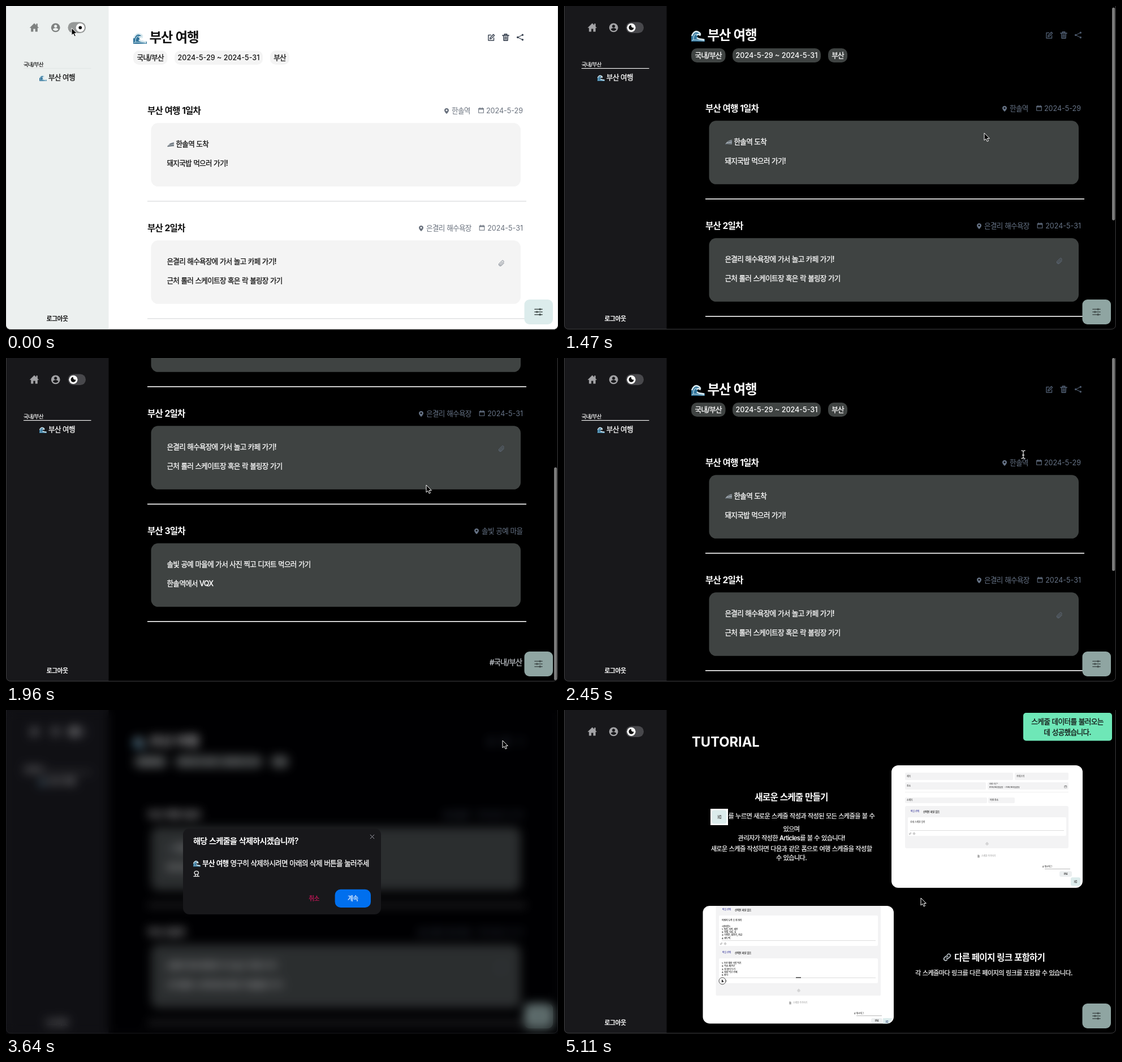
These frames come from a looping animation (976 by 574 pixels, 5.39 s). An HTML page:

```html
<!DOCTYPE html>
<html lang="ko">
<head>
<meta charset="utf-8">
<title>여행 스케줄</title>
<style>
:root {
  --k: 0%;
  --bg: color-mix(in srgb, #fff, #000 var(--k));
  --side: color-mix(in srgb, #ecf0ef, #18181b var(--k));
  --ink: color-mix(in srgb, #111, #fff var(--k));
  --card: color-mix(in srgb, #f4f4f4, #3f4342 var(--k));
  --rule: color-mix(in srgb, #e1e3e4, #fff var(--k));
  --side-rule: color-mix(in srgb, #e2e6e5, #fff var(--k));
  --meta: color-mix(in srgb, #69717d, #667386 var(--k));
  --tool: color-mix(in srgb, #3b4452, #4b586b var(--k));
  --nav: color-mix(in srgb, #7f8281, #a3a3a6 var(--k));
  --track: color-mix(in srgb, #969998, #48484c var(--k));
  --fab: color-mix(in srgb, #dcecec, #8fa5a2 var(--k));
  --edge: color-mix(in srgb, #d4d6d6, #3c3c3e var(--k));
}
html, body { margin: 0; width: 100%; height: 100%; overflow: hidden; background: #000; }
svg, #veil { position: absolute; left: 0; top: 0; width: 976px; height: 574px; }
#veil { background: rgba(2, 2, 8, .31); backdrop-filter: blur(9px); }
text {
  font-family: Inter, "Noto Sans CJK KR", "Noto Sans CJK", sans-serif;
  letter-spacing: -.055em; word-spacing: .05em; white-space: pre;
  fill: currentColor; stroke: currentColor; stroke-width: 0;
}
text.latin { letter-spacing: 0; word-spacing: 0; }
text.medium { stroke-width: .022em; }
</style>
</head>
<body>
<svg id="page" viewBox="0 0 976 574"></svg>
<div id="veil"></div>
<svg id="top" viewBox="0 0 976 574"></svg>
<script>
const LOOP = 5390, STEP = 70;
const $ = id => document.getElementById(id);

// Drawing helpers; text is placed by its vertical centre.
const text = (x, y, size, str, { fill = 'var(--ink)', weight = 500, anchor = 'start', latin } = {}) =>
  `<text x="${x}" y="${y + size * .37}" font-size="${size}" font-weight="${weight}" text-anchor="${anchor}"
    class="${latin ? 'latin' : weight === 500 ? 'medium' : ''}" style="color:${fill}">${str}</text>`;
const mid = (x, y, size, str, opt) => text(x, y, size, str, { anchor: 'middle', ...opt });
const rect = (x, y, w, h, r, fill, attrs = '') =>
  `<rect x="${x}" y="${y}" width="${w}" height="${h}" rx="${r}" style="fill:${fill}" ${attrs}/>`;
const circle = (x, y, r, fill) => `<circle cx="${x}" cy="${y}" r="${r}" style="fill:${fill}"/>`;
const group = (id, body) => `<g id="${id}">${body}</g>`;

const SOLID = {
  home: 'M10 21v-6h4v6h5v-8h3l-3-2.8V4h-3v3.2L12 3 2 13h3v8z',
  user: 'M12 2a10 10 0 1 0 0 20a10 10 0 1 0 0-20zm0 3.5a3.3 3.3 0 1 1 0 6.6a3.3 3.3 0 1 1 0-6.6zm0 13.7c-2.5 0-4.7-1.3-6-3.2c0-2 4-3.1 6-3.1s6 1.1 6 3.1c-1.3 1.9-3.5 3.2-6 3.2z',
  pin: 'M12 2C8 2 4 5 4 9.5c0 5.3 8 13 8 13s8-7.7 8-13C20 5 16 2 12 2zm0 4.5a3 3 0 1 1 0 6a3 3 0 1 1 0-6z',
  moon: 'M12 3a9 9 0 1 0 9 9a7 7 0 0 1-9-9z',
  file: 'M5 2h9l5 5v15H5z'
};
const LINE = {
  calendar: 'M3 5h18v16H3zM3 8h18M8 1v5M16 1v5',
  edit: 'M11 4H3v17h17v-8M18.5 2l3.5 3.5L12 15l-4 1l1-4z',
  trash: 'M2 6h20M8 6V2h8v4M5 6l1 16h12l1-16M10 10v8M14 10v8',
  share: 'M20 4L4 12l16 8',
  clip: 'M20 11l-8.5 8.5a5 5 0 0 1-7-7L13.5 3.5a3.5 3.5 0 0 1 5 5L9.5 17.5a1.8 1.8 0 0 1-2.5-2.5L15 7',
  sliders: 'M2 5h20M2 12h20M2 19h20',
  link: 'M10 14a5 5 0 0 0 7 0l4-4a5 5 0 0 0-7-7l-2 2M14 10a5 5 0 0 0-7 0l-4 4a5 5 0 0 0 7 7l2-2',
  close: 'M4 4l16 16M20 4L4 20',
  shareDots: 'M20 4h.01M4 12h.01M20 20h.01',
  sliderDots: 'M16 5h.01M8 12h.01M16 19h.01',
  plus: 'M12 3a9 9 0 1 0 .01 0M12 8v8M8 12h8'
};
const box = (x, y, size, body) =>
  `<g transform="translate(${x - size / 2} ${y - size / 2}) scale(${size / 24})">${body}</g>`;
const icon = (name, x, y, size, color, width = 2.2) => box(x, y, size, SOLID[name]
  ? `<path d="${SOLID[name]}" fill-rule="evenodd" style="fill:${color}"/>`
  : `<path d="${LINE[name]}" fill="none" stroke-width="${width}" stroke-linecap="round" stroke-linejoin="round" style="stroke:${color}"/>`);
const sliders = (x, y, size, color) =>
  icon('sliders', x, y, size, color) + icon('sliderDots', x, y, size, color, 5.5);
const wave = (x, y, size) => box(x, y, size, `
  <path d="M0 22V13C2 7 6 3 11 4c5 1 7 4 5 7c-3-2-6 0-5 3c3 4 8 2 13 4v4z" fill="#2f7299"/>
  <path d="M1 12C3 6 7 3 11 4.500c4 1.500 6 4 4.500 6c-2-2-5-1.500-6 .5M10 15c3 4 8 2 13 4" fill="none" stroke="#dcebf0" stroke-width="2.600"/>
  <path d="M4 19C3 13 6 9 9 8M1 20c6-3 14 1 22 1" fill="none" stroke="#9cc4d6" stroke-width="1.500"/>`);
const train = (x, y, size) => box(x, y, size, `
  <path d="M1 19C5 12 12 6 23 5v14z" fill="#a9b0b6"/>
  <path d="M2 19L23 15M9 12l14-4" stroke="#59636c" stroke-width="2.6"/>`);

const chip = (x, y, w, str, latin) => rect(x, y, w, 25, 10, 'var(--card)') +
  mid(x + w / 2, y + 12.3, 12.55, str, { latin });

function section(y, title, lines, place, pinX, date, calX) {
  const meta = { fill: 'var(--meta)', weight: 400 };
  return text(250, y, 15.6, title, { weight: 700 }) +
    icon('pin', pinX, y + 1, 12, 'var(--meta)') + text(pinX + 9, y, 12.6, place, meta) +
    (date ? icon('calendar', calX, y, 11.5, 'var(--meta)') +
      text(914, y, 12.55, date, { ...meta, anchor: 'end', latin: true }) : '') +
    rect(256.5, y + 22.3, 653.5, 112.5, 12.5, 'var(--card)') +
    lines.map((s, i) => text(s.x || 284.5, y + 59.3 + i * 34.4, 12.55, s.str || s)).join('') +
    rect(250, y + 160, 670, 1.6, 0, 'var(--rule)');
}

const trip = wave(237, 57, 24) + text(253.5, 55, 23.5, '부산 여행', { weight: 700 }) +
  chip(225, 79, 60.5, '국내/부산') + chip(298, 79, 156, '2024-5-29 ~ 2024-5-31', true) + chip(467, 79, 34, '부산') +
  icon('edit', 858, 56, 13.5, 'var(--tool)', 2.6) +
  group('bin', icon('trash', 883.5, 55.5, 13.5, 'var(--tool)', 2.8)) +
  icon('share', 909, 55.5, 13, 'var(--tool)') + icon('shareDots', 909, 55.5, 13, 'var(--tool)', 6.5) +
  section(185, '부산 여행 1일차', [{ x: 300.5, str: '한솔역 도착' }, '돼지국밥 먹으러 가기!'], '한솔역', 779, '2024-5-29', 840) +
  train(291, 245, 13) +
  section(393, '부산 2일차', ['은결리 해수욕장에 가서 놀고 카페 가기!', '근처 롤러 스케이트장 혹은 락 볼링장 가기'],
    '은결리 해수욕장', 734, '2024-5-31', 841.5) +
  icon('clip', 876, 456, 13, 'var(--meta)', 1.6) +
  section(601, '부산 3일차', ['솔빛 공예 마을에 가서 사진 찍고 디저트 먹으러 가기', '한솔역에서 VQX'], '솔빛 공예 마을', 832) +
  text(855, 834, 13.2, '#국내/부산', { fill: '#b9bdc2' });

const grey = '#f3f3f4', faint = '#aaa';
const tiny = (x, y, str, fill = '#555', size = 4) => text(x, y, size, str, { fill });
const field = (x, y, w, h, str) => rect(x, y, w, h, 2, grey) + tiny(x + 3, y + h / 2, str);
const picker = (x, y) => tiny(x, y, '파일 선택', '#3b3b9c') + tiny(x + 22, y, '선택된 파일 없음', '#222', 4.4);
const footer = (x, y) => icon('file', x, y, 6, faint) + tiny(x + 5, y, '스케줄 추가하기', faint);
const attach = (x, y) => icon('clip', x, y, 5, '#888') + icon('plus', x + 7, y, 5, '#888');
const list = (x, y, lines) => lines.map((s, i) => tiny(x, y + i * 5.3, s, '#222')).join('');

const formPanel = rect(579, 98, 338, 217, 12, '#fff') +
  field(603, 111, 191, 13, '제목') + field(797, 111, 95, 13, '카테고리') +
  field(603, 128, 143, 13, '장소') + rect(749, 128, 143, 13, 2, grey) +
  tiny(752, 131, '여행 기간 *', '#555', 3.4) + text(752, 136.3, 4, 'mm/dd/yyyy  - mm/dd/yyyy', { fill: '#444', latin: true }) +
  icon('calendar', 887, 136, 5, '#555') +
  rect(603, 145, 289, .5, 0, '#ddd') +
  field(603, 155, 145, 10, '소제목') + field(750, 155, 47, 10, '여행 장소') +
  rect(603, 170, 289, 75, 3, grey) + picker(613, 180) + rect(608, 190, 280, 33, 2, '#fff') +
  tiny(612, 199, '상세 스케줄 입력') + rect(612, 213.5, 272, .5, 0, '#bbb') + attach(612, 219) +
  icon('plus', 748, 237, 6, faint) + footer(733, 259) +
  tiny(846, 278, '# 해시태그') + rect(850, 281.5, 45, .6, 0, '#888') +
  rect(876, 285.5, 22, 10, 3, '#eceff0') + mid(887, 290.5, 4, '완료', { fill: '#111' }) +
  rect(896, 296.5, 17, 15, 3, '#dcecec') + sliders(904.5, 304, 6, '#444');

const listPanel = rect(245.5, 347, 337.5, 208.5, 12, '#fff') +
  rect(268.5, 347, 291.5, 159, 2, grey) + picker(280, 354) +
  rect(274, 364, 281, 54, 2, '#fff') +
  list(279, 372.5, ['여행지 도착 후 짐 정리', '', '&lt;준비물&gt;', '1. 칫솔, 치약, 세안', '2. 양말, 담요, 옷', '3. 이어폰, 충전기, 지갑', '4. 핸드백']) +
  rect(279, 408.5, 272, .5, 0, '#bbb') + attach(278, 414) +
  picker(280, 430) + rect(274, 440, 281, 44, 2, '#fff') +
  list(279, 448.5, ['1. 부산 돼지 국밥 먹기', '2. 숙소 체크인', '3. 짐 풀어 두기', '4. 점심 먹고 카페', '5. 바다']) +
  rect(279, 474, 272, .5, 0, '#bbb') + rect(410, 473.4, 9, 1.4, 0, '#333') +
  attach(279, 480) + '<circle cx="280" cy="480" r="6" fill="#fff8" stroke="#222" stroke-width=".8"/>' +
  '<path d="M279 477v6l1.4-1.2h2.4z" fill="#222"/>' +
  icon('plus', 415, 497, 6, faint) + footer(400, 519) +
  tiny(513, 538, '# 해시태그') + rect(517, 541.5, 45, .6, 0, '#888') +
  rect(543, 546, 20, 9, 3, '#eceff0') + mid(553, 550.5, 4, '완료', { fill: '#111' }) +
  '<path d="M564 546h16q-3 9.5-10 9.5h-6z" fill="#dcecec"/>' + sliders(571, 552, 5, '#347');

const tutorial = text(226, 56, 23.7, 'TUTORIAL', { weight: 700, latin: true }) +
  mid(402, 154, 15.7, '새로운 스케줄 만들기', { weight: 700 }) +
  rect(259, 175, 31, 29, 0, '#fff') + rect(261.5, 177.5, 26, 24, 4, '#dcecec') + sliders(275, 189.5, 8, '#444') +
  text(290.5, 188, 11.2, '를 누르면 새로운 스케줄 작성과 작성된 모든 스케줄을 볼 수') +
  [[211, '있으며'], [227, '관리자가 작성한 Articles를 볼 수 있습니다!'],
   [245.5, '새로운 스케줄 작성하면 다음과 같은 폼으로 여행 스케줄을 작성할'], [261.5, '수 있습니다.']]
    .map(([y, s]) => mid(402, y, 11.2, s)).join('') +
  icon('link', 677.5, 438, 14, '#b4bcc2', 3) + text(690, 438, 15.7, '다른 페이지 링크 포함하기', { weight: 700 }) +
  mid(760, 466, 11.2, '각 스케줄마다 링크를 다른 페이지의 링크를 포함할 수 있습니다.') +
  group('panels', formPanel + listPanel);

const sidebar = rect(0, 0, 181.5, 574, 0, 'var(--side)') +
  icon('home', 50, 38, 20, 'var(--nav)') + icon('user', 87.7, 38.3, 19, 'var(--nav)') +
  rect(109.5, 28.5, 31.5, 19.5, 9.7, 'var(--track)') +
  group('thumb', circle(0, 38.3, 7.6, '#fff') +
    group('sun', circle(0, 38.3, 2.9, '#111')) +
    group('moon', icon('moon', 0, 38.3, 12, '#111'))) +
  group('trips', text(31, 103.5, 9.3, '국내/부산') + rect(31, 110, 119.5, 1.1, 0, 'var(--side-rule)') +
    wave(65.5, 127.5, 13) + text(75, 126.5, 12.6, '부산 여행')) +
  mid(90.5, 554, 11, '로그아웃', { weight: 600 });

$('page').innerHTML = rect(0, 0, 976, 574, 0, 'var(--bg)') +
  group('trip', trip) + group('tutorial', tutorial) + sidebar +
  rect(916.5, 520, 50.5, 44, 9, 'var(--fab)') + sliders(941.5, 542, 16, '#46504f') +
  rect(969, 0, 5.2, 377, 2.6, '#7b7b7b', 'id="bar"') +
  '<path d="M0 564v10h976v-10q0 9-9 9H9q-9 0-9-9z"/>' +
  '<path d="M.5 0v564q0 8.5 8.5 8.5h958q8.5 0 8.5-8.5V0" fill="none" style="stroke:var(--edge)"/>';

const white = { fill: '#fff' };
$('top').innerHTML = group('modal',
  rect(313, 210, 350, 152, 11, '#18181b') +
  text(331, 232, 14.2, '해당 스케줄을 삭제하시겠습니까?', { ...white, weight: 600 }) +
  icon('close', 647.5, 224.5, 10, '#a1a1aa', 2.4) +
  wave(337.5, 272, 13) + text(347, 271, 12.6, '부산 여행', { ...white, weight: 700 }) +
  text(396.5, 271, 12.6, '영구히 삭제하시려면 아래의 삭제 버튼을 눌러주세', white) + text(331, 290, 12.6, '요', white) +
  rect(513.5, 318, 62.5, 32, 10, '#f31260', 'id="cancel" fill-opacity=".2"') +
  mid(544.5, 334.5, 10.8, '취소', { fill: '#c9175a' }) +
  group('confirm', rect(581.6, 317.8, 63.4, 32.2, 10, '#006fee') + mid(613.3, 334, 10.8, '계속', white))) +
  group('toast', rect(812, 5, 157, 49.5, 5, '#6ee7b7') +
    mid(890, 20.3, 12.7, '스케줄 데이터를 불러오는', { fill: '#111' }) + mid(890, 39.3, 12.7, '데 성공했습니다.', { fill: '#111' })) +
  group('cursor', `
    <path id="arrow" d="M0 0V13L3 10.3L5.2 15L7.4 14L5.3 9.5H9.3Z" stroke="#fff"/>
    <path id="beam" d="M-3.5-7q3.5 0 3.5 2V5q0 2-3.5 2M3.5-7q-3.5 0-3.5 2V5q0 2 3.5 2M-2 1h4" fill="none" stroke="#ddd" stroke-width="1.3"/>
    <path id="hand" d="M-.5 1q1.5-1.8 2.5.3l1.2 3.4l5 1q1.6.5 1.3 2.3l-.8 5.2H3L-2.3 8.5q-.5-1.8 1.8-.9l1 .8z" fill="#fff" stroke="#111"/>`);

// Piecewise linear value along [time, value] stops.
function along(t, stops) {
  const i = stops.findIndex(s => s[0] > t);
  if (i === 0) return stops[0][1];
  if (i < 0) return stops[stops.length - 1][1];
  const [t0, a] = stops[i - 1], [t1, b] = stops[i];
  return a + (b - a) * (t - t0) / (t1 - t0);
}
const within = (t, a, b) => t >= a && t < b;
const show = (id, on) => { $(id).style.display = on ? '' : 'none'; };

const DARK = [[210, 0], [280, .15], [350, .5], [420, .78], [490, .92], [560, .98], [630, 1]];
const SCROLL = [[1400, 0], [1470, 4], [1540, 110], [1610, 250], [1680, 299], [1890, 299], [1960, 295], [2030, 170], [2100, 40], [2170, 0]];
const OPEN = [[3290, 0], [3360, .25], [3430, .62], [3500, .86], [3570, .96], [3640, 1], [4760, 1], [4830, .7], [4900, .25], [4970, 0]];
const PATH = [
  [700, 116, 39], [770, 190, 68], [840, 420, 160], [910, 620, 222], [980, 685, 239],
  [1120, 685, 239], [1190, 692, 238], [1260, 725, 229], [1330, 743, 225],
  [2380, 743, 225], [2450, 812, 171], [2590, 852, 112], [2940, 888, 60], [3150, 879, 54],
  [3640, 878, 54], [3710, 800, 150], [3780, 640, 285], [3850, 548, 331], [4060, 548, 331],
  [4410, 629, 333], [4760, 631, 333]
];
const PATH_X = PATH.map(p => [p[0], p[1]]), PATH_Y = PATH.map(p => [p[0], p[2]]);

function draw(now) {
  const t = Math.floor((now % LOOP + .5) / STEP) * STEP;
  const dark = along(t, DARK), scroll = along(t, SCROLL), open = along(t, OPEN);
  const home = t >= 4900;

  document.documentElement.style.setProperty('--k', dark * 100 + '%');
  $('thumb').setAttribute('transform', `translate(${131.3 - 12.3 * dark} 0)`);
  show('sun', dark < .5);
  show('moon', dark >= .5);

  show('trip', !home);
  show('trips', !home);
  show('tutorial', home);
  $('trip').setAttribute('transform', `translate(0 ${-scroll})`);
  $('bar').setAttribute('y', scroll * .657);
  $('bar').style.opacity = t < 1470 ? 0 : along(t, [[2660, 1], [2870, 0]]);
  $('bin').style.opacity = within(t, 3010, 3360) ? .8 : 1;
  $('panels').style.opacity = along(t, [[4900, .6], [5040, 1]]);

  $('veil').style.opacity = open;
  show('veil', open > 0);
  $('modal').style.opacity = open;
  const zoom = 1.03 - .03 * open;
  $('modal').setAttribute('transform', `translate(488 286) scale(${zoom}) translate(-488 -286)`);
  $('cancel').style.opacity = along(t, [[3780, 0], [3920, 1], [4130, 1], [4270, 0]]);
  $('confirm').style.opacity = along(t, [[4270, 1], [4410, .9]]);
  const press = along(t, [[4620, 1], [4760, .97]]);
  $('confirm').setAttribute('transform', `translate(613.5 334) scale(${press}) translate(-613.5 -334)`);
  $('toast').style.opacity = along(t, [[4830, 0], [4970, 1]]);

  $('cursor').setAttribute('transform', `translate(${along(t, PATH_X)} ${along(t, PATH_Y)})`);
  const beam = within(t, 2450, 2520);
  const hand = within(t, 2800, 3500) || within(t, 3850, 4130) || within(t, 4270, 4900);
  show('beam', beam);
  show('hand', hand);
  show('arrow', !beam && !hand);
  requestAnimationFrame(() => draw(performance.now()));
}
draw(0);
</script>
</body>
</html>
```
